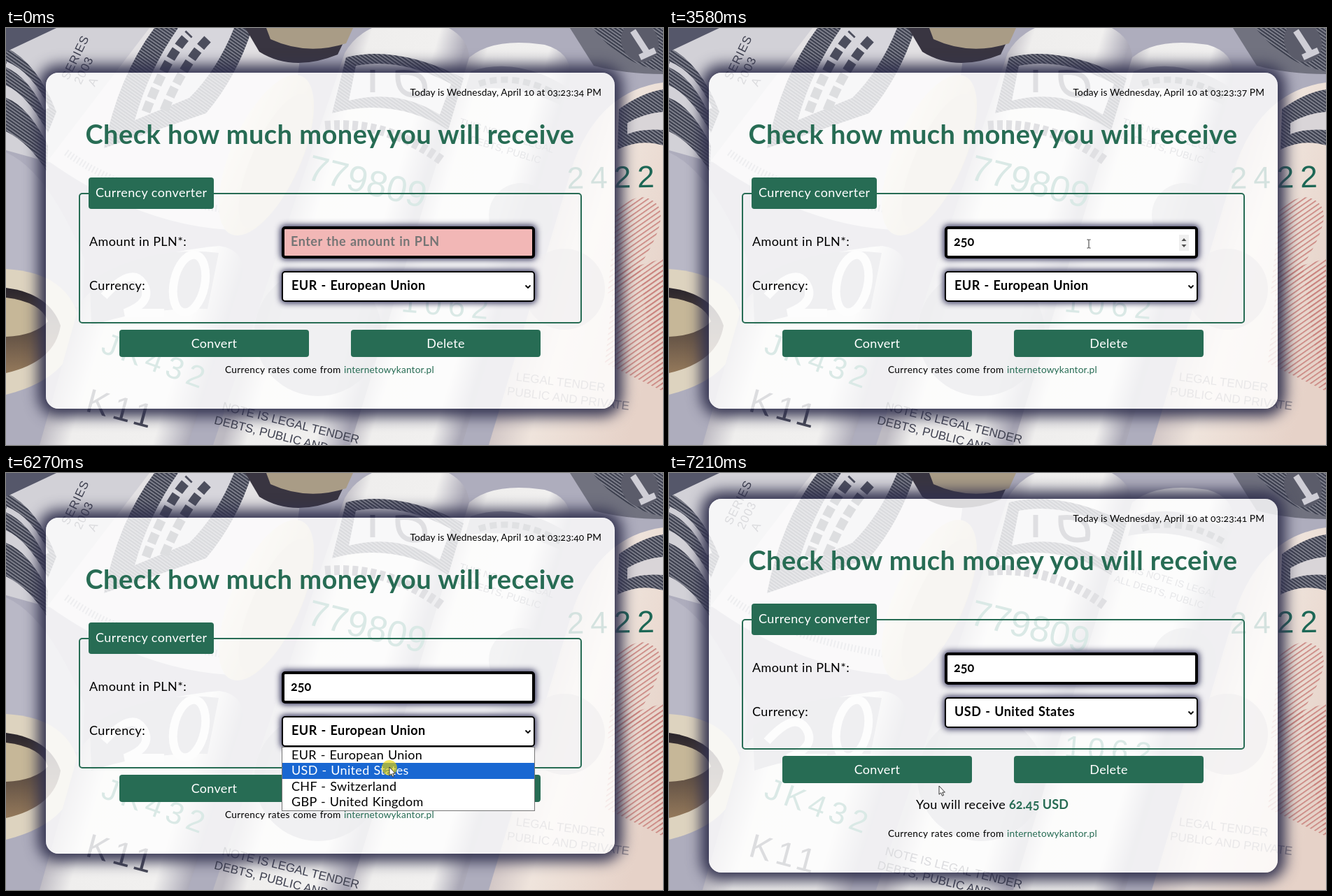
An HTML page that plays this animation: 939 by 597 pixels, repeating every 8000 ms.

```html
<!DOCTYPE html>
<html lang="en">
<head>
<meta charset="utf-8">
<title>Currency converter</title>
<style>
  html, body { margin: 0; width: 100%; height: 100%; overflow: hidden; }
  #stage { position: relative; width: 939px; height: 597px; overflow: hidden; background: #bdbccb;
    font-family: Lato, "Open Sans", sans-serif; font-variant-numeric: oldstyle-nums; color: #000; }
  #stage div, #stage > svg { position: absolute; box-sizing: border-box; }
  .text { white-space: pre; line-height: 1.2; }
  .panel { border-radius: 18px; background: rgba(255,255,255,.81); box-shadow: 0 0 20px 11px #32324f; }
  .fieldset { border: 2px solid #276c54; border-radius: 5px; }
  .legend { background: #276c54; border-radius: 4px; }
  .field { background: #fff; border: 2px solid #000; border-radius: 5px; box-shadow: 0 0 8px 2px #33335a; }
  .field.thick { border-width: 4px; }
  .button { background: #276c54; border-radius: 4px; color: #fff; font-size: 18px; letter-spacing: .3px;
    display: flex; align-items: center; justify-content: center; }
  .button.hover { background: #5a8e78; }
  .button.active { border: 2px solid #276c54; }
  .list { background: #fff; border: 1px solid #767676; }
  .spot { border-radius: 50%; background: rgba(235,215,0,.64); }
</style>
</head>
<body>
<div id="stage">
<svg width="939" height="597" viewBox="0 0 939 597">
  <defs>
    <linearGradient id="paper">
      <stop offset="0" stop-color="#bdbac2"/><stop offset=".2" stop-color="#efeeed"/>
      <stop offset=".75" stop-color="#f1f0ef"/><stop offset="1" stop-color="#aaa8b6"/>
    </linearGradient>
    <linearGradient id="roll1" href="#paper" gradientUnits="userSpaceOnUse" x1="398" y1="300" x2="559" y2="349"/>
    <linearGradient id="roll2" href="#paper" gradientUnits="userSpaceOnUse" x1="576" y1="300" x2="722" y2="344"/>
    <linearGradient id="roll3" href="#paper" gradientUnits="userSpaceOnUse" x1="76" y1="500" x2="274" y2="560"/>
    <linearGradient id="cream">
      <stop offset="0" stop-color="#ece5d6"/><stop offset="1" stop-color="#cdc0a8"/>
    </linearGradient>
    <linearGradient id="rose" gradientUnits="userSpaceOnUse" x1="745" y1="400" x2="930" y2="456">
      <stop offset="0" stop-color="#cfc4c4"/><stop offset=".3" stop-color="#efe4dc"/><stop offset="1" stop-color="#e6d2c8"/>
    </linearGradient>
    <linearGradient id="hollow" x2="0" y2="1">
      <stop offset="0" stop-color="#29242b"/><stop offset="1" stop-color="#94795b"/>
    </linearGradient>
    <pattern id="hatch" width="4" height="4" patternUnits="userSpaceOnUse" patternTransform="rotate(35)">
      <rect width="4" height="4" fill="#8b8c98"/><rect width="4" height="2.4" fill="#3c3f4e"/>
    </pattern>
    <pattern id="red" width="6" height="6" patternUnits="userSpaceOnUse" patternTransform="rotate(-35)">
      <rect width="6" height="1.6" fill="#c9817c"/>
    </pattern>
  </defs>
  <rect width="939" height="597" fill="#aeadbd"/>

  <!-- flat notes, upper left -->
  <path d="M0 0H230L90 200 0 175Z" fill="#d2d1d7"/>
  <path d="M0 28Q45 50 72 120L60 150Q30 95 0 82Z" fill="url(#hatch)"/>
  <path d="M0 52Q34 66 58 116" fill="none" stroke="#cfced5" stroke-width="8"/>
  <path d="M0 100Q32 112 60 168L58 205Q34 165 0 148Z" fill="url(#hatch)"/>
  <path d="M0 0H72L0 34Z" fill="#55576a"/>
  <g font-family="'Liberation Sans', sans-serif" font-size="17" fill="#3f4150" transform="rotate(-64 90 78)">
    <text x="92" y="76" letter-spacing="1">SERIES</text><text x="94" y="95" letter-spacing="1">2003</text>
    <text x="100" y="114">A</text>
  </g>

  <!-- open roll -->
  <path d="M205 0H420Q430 90 345 290Q200 290 60 190Z" fill="#e4e2e4"/>
  <path d="M212 0H352Q330 70 286 122L140 172Q160 70 212 0Z" fill="url(#hatch)"/>
  <path d="M246 0H326Q302 60 262 100L184 132Q204 60 246 0Z" fill="#d7d6dc"/>
  <path d="M200 120Q230 40 262 8M226 118Q254 50 290 14" fill="none" stroke="#4c4e5d" stroke-width="13" stroke-dasharray="15 6"/>
  <path d="M86 178Q170 240 326 262" fill="none" stroke="#a4a4b2" stroke-width="10" stroke-dasharray="2 3"/>
  <path d="M342 0H492L474 38Q410 64 362 34Z" fill="#393541"/>
  <path d="M372 0H496L486 22Q430 40 378 16Z" fill="#a99c86"/>
  <ellipse cx="372" cy="182" rx="50" ry="124" transform="rotate(24 372 182)" fill="url(#cream)"/>
  <ellipse cx="385" cy="190" rx="34" ry="104" transform="rotate(24 385 190)" fill="#d7cdbb"/>

  <!-- lower left -->
  <path d="M0 178Q60 205 112 330L110 400 0 390Z" fill="#b9b8c6"/>
  <path d="M0 345Q90 350 105 420Q100 500 0 525Z" fill="#ddd3bf"/>
  <path d="M0 372Q62 380 78 426Q70 478 0 494Z" fill="url(#hollow)"/>
  <path d="M0 386Q50 392 60 420Q42 440 0 442Z" fill="#c6b798"/>
  <path d="M105 395Q160 325 305 312Q345 318 336 360L260 597H48Z" fill="url(#roll3)"/>
  <path d="M120 362Q205 310 304 322L288 402Q200 400 122 426Z" fill="#a9a9b5"/>
  <path d="M140 384Q180 340 196 366T170 408H226" fill="none" stroke="#f3f3f3" stroke-width="12"/>
  <ellipse cx="262" cy="366" rx="22" ry="42" transform="rotate(12 262 366)" fill="none" stroke="#f3f3f3" stroke-width="12"/>

  <!-- rose note, right -->
  <path d="M812 190Q850 90 939 78V597H690Z" fill="url(#rose)"/>
  <path d="M876 116Q910 92 939 88V168Q906 158 874 174Z" fill="url(#hatch)"/>
  <path d="M888 136Q912 122 939 120V146Q908 144 888 152Z" fill="#d9d5d8"/>
  <path d="M872 262Q905 230 928 250T906 340Q918 450 939 520V340L860 380Z" fill="url(#red)"/>
  <path d="M870 350L939 330V520L856 480Z" fill="url(#red)"/>

  <!-- upper right -->
  <path d="M806 0H939V66Q885 66 840 54Z" fill="#71727f"/>
  <path d="M838 0H939V62Q880 52 838 0Z" fill="url(#hatch)"/>
  <ellipse cx="906" cy="20" rx="26" ry="30" transform="rotate(-30 906 20)" fill="#5b5c6a"/>
  <path d="M896 4L918 38M906 42L928 32" fill="none" stroke="#cfced6" stroke-width="9"/>

  <!-- two long rolls -->
  <path d="M656 48Q690 12 770 24Q812 36 806 76L652 597H486Z" fill="url(#roll2)"/>
  <path d="M664 62Q730 40 800 84L792 110Q722 76 656 90Z" fill="#a4a4b0"/>
  <path d="M676 80Q730 62 792 98" fill="none" stroke="#5c5e6d" stroke-width="9" stroke-dasharray="10 6"/>
  <path d="M484 36Q510 -12 592 -14Q660 0 662 42L492 597H296Z" fill="url(#roll1)"/>
  <path d="M486 42Q560 24 654 72L632 146Q554 98 466 122Z" fill="url(#hatch)"/>
  <path d="M500 54Q564 42 636 80L620 124Q560 86 490 104Z" fill="#dcdbe0"/>
  <path d="M524 60V92M560 64Q604 60 598 94Q558 104 560 64Z" fill="none" stroke="#555765" stroke-width="7"/>
  <path d="M456 140Q546 132 626 192" fill="none" stroke="#5a5c69" stroke-width="14" stroke-dasharray="8 5"/>
  <circle cx="446" cy="436" r="91" fill="#9b9ca8" opacity=".75"/>
  <circle cx="736" cy="268" r="46" fill="#a9aab3" opacity=".7"/>
  <circle cx="798" cy="374" r="58" fill="#b5adb3" opacity=".7"/>

  <g font-family="'Liberation Sans', sans-serif" fill="#3b8a78">
    <text x="428" y="216" font-size="52" transform="rotate(14 428 216)">779809</text>
    <text x="564" y="406" font-size="44" letter-spacing="9" transform="rotate(5 564 406)">1062</text>
    <text x="802" y="230" font-size="44" letter-spacing="9" transform="rotate(-1 802 230)" fill="#1c6755">2422</text>
    <text x="134" y="464" font-size="44" letter-spacing="7" transform="rotate(20 134 464)">JK432</text>
    <text x="112" y="548" font-size="48" letter-spacing="7" transform="rotate(15 112 548)" fill="#464857">K11</text>
  </g>
  <g font-family="'Liberation Sans', sans-serif" font-size="17" fill="#3f4150">
    <g transform="rotate(14 306 546)"><text x="308" y="546">NOTE IS LEGAL TENDER</text><text x="302" y="568">DEBTS, PUBLIC AND</text></g>
    <g transform="rotate(7 722 506)" fill="#8b8389"><text x="728" y="504">LEGAL TENDER</text><text x="718" y="526">PUBLIC AND PRIVATE</text></g>
    <g transform="rotate(17 640 140)" font-size="14" fill="#7d7f8c"><text x="646" y="136">THIS NOTE IS LEGAL</text><text x="640" y="156">ALL DEBTS, PUBLIC</text></g>
  </g>
</svg>
</div>

<script>
const LOOP = 8000;
const GREEN = '#276c54';
const stage = document.getElementById('stage');

function box(parent, cls, x = 0, y = 0, w = 0, h = 0) {
  const e = document.createElement('div');
  e.className = cls;
  Object.assign(e.style, { left: x + 'px', top: y + 'px', width: w + 'px', height: h + 'px' });
  parent.append(e);
  return e;
}

// y is the baseline
function text(parent, x, y, size, str, { bold, color = '#000', ls = .4, ws = 0, align = 'left' } = {}) {
  const shift = { left: 0, center: 400, right: 800 }[align];
  const e = box(parent, 'text', x - shift, y - .987 * size, 800, 1.2 * size);
  Object.assign(e.style, { fontSize: size + 'px', fontWeight: bold ? 700 : 400, color,
    letterSpacing: ls + 'px', wordSpacing: ws + 'px', textAlign: align });
  e.textContent = str;
  return e;
}

function svg(parent, w, h, body) {
  const e = box(parent, '', 0, 0, w, h);
  e.innerHTML = `<svg width="${w}" height="${h}" style="position:absolute;overflow:visible">${body}</svg>`;
  return e;
}

const move = (e, x, y) => { e.style.left = x + 'px'; e.style.top = y + 'px'; };
const show = (e, on) => { e.style.display = on ? '' : 'none'; };
const within = (t, spans) => spans.some(([a, b]) => t >= a && t < b);

const panel = box(stage, 'panel', 57, 64, 813, 481);

const form = box(stage, '');
const clock = text(form, 851, 97.5, 13.7, '', { ls: .12, align: 'right' });
text(form, 463, 166.5, 38, 'Check how much money you will receive', { bold: true, color: GREEN, ls: .46, align: 'center' });
box(form, 'fieldset', 104, 236, 719, 187);
box(form, 'legend', 118, 214, 179, 45);
text(form, 128, 243, 18, 'Currency converter', { color: '#fff' });
text(form, 119, 313, 18, 'Amount in PLN*:');
text(form, 119, 376, 18, 'Currency:');

const input = box(form, 'field thick', 394, 284, 362, 46);
const hint = text(form, 407, 313, 18, 'Enter the amount in PLN', { bold: true, color: '#757575', ls: .5, ws: 1 });
const amount = text(form, 407, 313, 18, '', { bold: true, ls: 0 });
const caret = box(form, '', 407, 296, 1, 21);
caret.style.background = '#000';
const spinner = svg(form, 14, 23, '<rect width="14" height="23" fill="#efefef"/><path d="M3.5 9L7 5 10.5 9ZM3.5 14L7 18 10.5 14Z" fill="#505050"/>');
move(spinner, 729, 296);

box(form, 'field', 394, 348, 362, 44);
const choice = text(form, 408, 376, 18, '', { bold: true, ls: .46, ws: 1 });
move(svg(form, 8, 5, '<path d="M.5 .5L4 4 7.5 .5" fill="none" stroke="#000" stroke-width="1.8"/>'), 742, 368);

const buttons = [[162, 'Convert'], [493, 'Delete']].map(([x, label]) => {
  const e = box(stage, 'button', x, 431.5, 271, 39);
  e.textContent = label;
  return { e, x };
});

const result = box(stage, '');
text(result, 353, 481.5, 18, 'You will receive ');
text(result, 486, 481.5, 18, '62.45 USD', { bold: true, color: GREEN, ls: .05 });

const footer = box(stage, '');
text(footer, 313, 495, 13.7, 'Currency rates come from ', { ls: .32, ws: .7 });
text(footer, 483, 495, 13.7, 'internetowykantor.pl', { color: GREEN, ls: .16 });

const names = ['EUR - European Union', 'USD - United States', 'CHF - Switzerland', 'GBP - United Kingdom'];
const list = box(stage, '');
box(list, 'list', 394, 392, 362, 92);
const rows = names.map((name, i) => {
  const bar = box(list, '', 395, 393 + 22.4 * i, 360, 22.4);
  return { bar, label: text(list, 408, 410.5 + 22.4 * i, 18, name, { ls: .32, ws: .9 }) };
});

const spot = box(stage, 'spot', 0, 0, 22, 22);
const outline = 'fill="#fff" stroke="#222" stroke-width=".9" stroke-linejoin="round"';
const cursors = {
  arrow: svg(stage, 10, 16, `<path d="M0 -1V11.2L2.7 8.8 4.6 13.2 6.6 12.3 4.7 8.1H8.4Z" ${outline}/>`),
  beam: svg(stage, 6, 14, '<path d="M-2.5 -6H-.6L0 -5.4 .6 -6H2.5M-2.5 6H-.6L0 5.4 .6 6H2.5M0 -5.4V5.4" fill="none" stroke="#333"/>'),
  hand: svg(stage, 12, 16, `<path d="M-1.4 1Q0 -1 1.2 1V6L5.6 7Q7.4 7.6 7 10L5.8 15H-.6L-4.4 10Q-4.6 8 -1.4 9.4Z" ${outline}/>`)
};

const path = [
  [570, 825, 541], [630, 775, 494], [700, 714, 437], [770, 656, 380], [900, 625, 366], [1160, 608, 361],
  [1359, 608, 361], [1360, 600, 309], [3940, 600, 309], [4200, 570, 356], [4450, 553, 391],
  [4800, 553, 391], [5120, 550, 372], [5600, 550, 372], [6070, 548, 422], [6560, 548, 422],
  [6840, 470, 436], [7080, 386, 449]
];
const clicks = [[1360, 1500], [5250, 5390], [6270, 6420], [7080, 7210]];
const blinks = [[1360, 1910], [2370, 3580], [4110, 4640]];
const keys = [[3050, '250', 438], [2860, '25', 427], [2370, '2', 417], [0, '', 407]];

function mouseAt(t) {
  const i = path.findIndex(p => p[0] > t);
  if (i < 0) return path[path.length - 1].slice(1);
  if (i === 0) return path[0].slice(1);
  const [a, b] = [path[i - 1], path[i]];
  const k = (t - a[0]) / (b[0] - a[0]);
  return [a[1] + k * (b[1] - a[1]), a[2] + k * (b[2] - a[2])];
}

function draw(t) {
  const [mx, my] = mouseAt(t);
  const visible = t >= 570;
  const done = t >= 7210, pressed = t >= 7080 && !done;
  const open = within(t, [[5250, 6420]]);

  // a pressed button gains a border, which lets the centred panel grow
  const dy = done ? -27 : pressed ? -1.5 : 0;
  panel.style.top = 64 + dy + 'px';
  panel.style.height = 481 - 2 * dy + 'px';
  form.style.top = dy + 'px';
  footer.style.top = -dy + 'px';
  show(result, done);

  const top = 431.5 + dy, height = pressed ? 42 : 39;
  let over = false;
  buttons.forEach(({ e, x }, i) => {
    const hover = visible && !open && mx >= x && mx < x + 271 && my >= top && my < top + height;
    over = over || hover;
    e.className = 'button' + (hover ? ' hover' : '') + (pressed && i === 0 ? ' active' : '');
    e.style.top = top + 'px';
    e.style.height = height + 'px';
  });

  const second = 34 + Math.min(7, Math.floor((t + 40) / 1000));
  clock.textContent = `Today is Wednesday, April 10 at 03:23:${second} PM`;

  const [, value, caretX] = keys.find(k => t >= k[0]);
  amount.textContent = value;
  input.style.background = value ? '#fff' : '#f2b7b6';
  show(hint, !value);
  caret.style.left = caretX + 'px';
  show(caret, within(t, blinks));

  const inInput = visible && !done && mx > 394 && mx < 756 && my > 284 && my < 330;
  show(spinner, inInput);

  choice.textContent = names[t < 6420 ? 0 : 1];
  show(list, open);
  const picked = my > 415 ? 1 : 0;
  rows.forEach(({ bar, label }, i) => {
    bar.style.background = i === picked ? '#1967d2' : 'none';
    label.style.color = i === picked ? '#fff' : '#000';
  });

  show(spot, within(t, clicks));
  move(spot, mx - 11, my - 11);
  const kind = over ? 'hand' : inInput ? 'beam' : 'arrow';
  for (const name in cursors) {
    show(cursors[name], visible && name === kind);
    move(cursors[name], mx, my);
  }
}

function tick() {
  draw(performance.now() % LOOP);
  requestAnimationFrame(tick);
}
tick();
</script>
</body>
</html>
```
